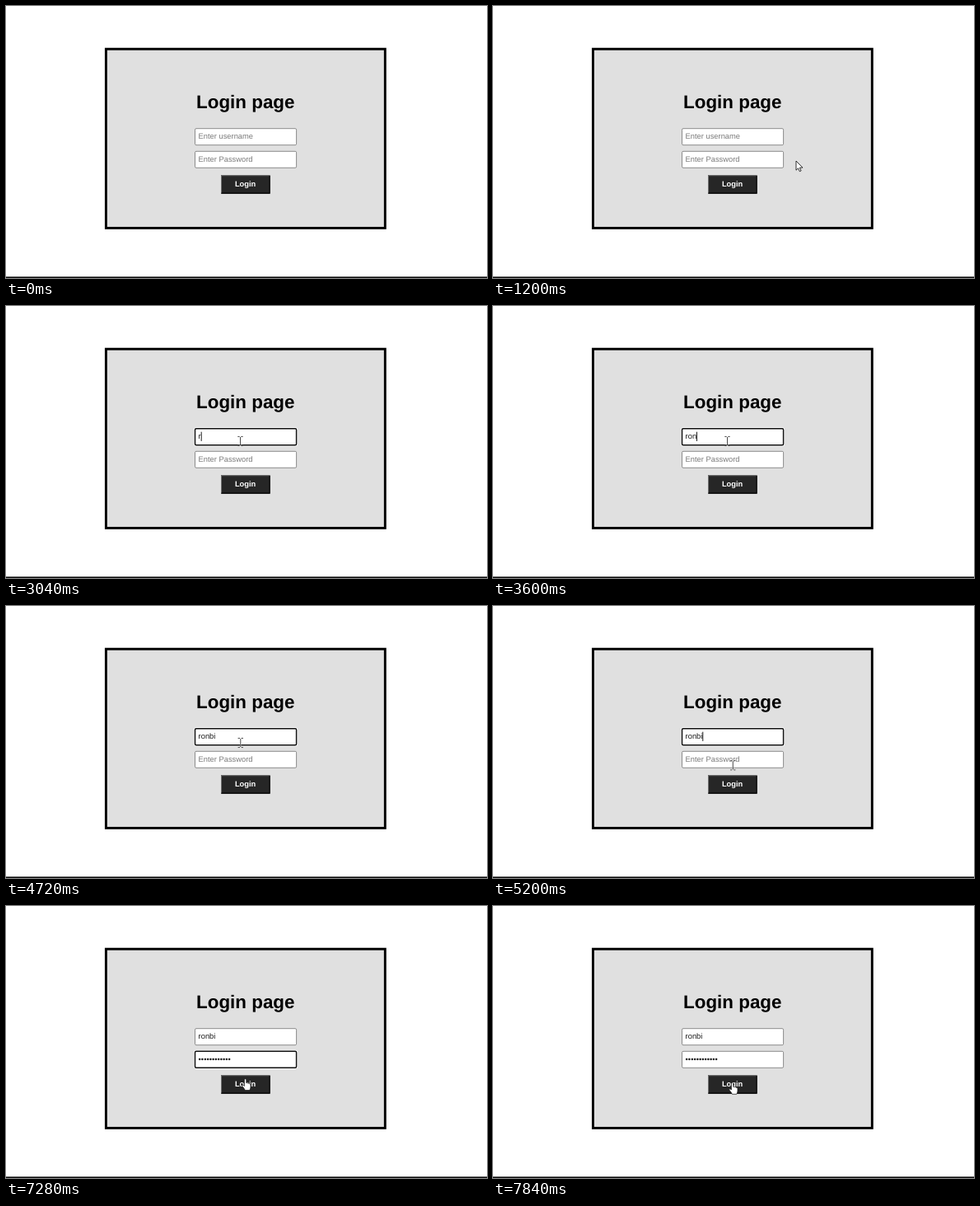
Write an HTML page that moves like this. It is 584x330 px and loops after 8000 ms.

```html
<!DOCTYPE html>
<html lang="en">
<head>
<meta charset="utf-8">
<title>Login page</title>
<style>
  html, body { margin: 0; width: 100%; height: 100%; overflow: hidden; background: #fff; }
  svg { display: block; width: 584px; height: 330px; }
  text { font: 9.33px "Liberation Sans", Arial, sans-serif; text-rendering: geometricPrecision; white-space: pre; }
  .bold { font-weight: bold; text-anchor: middle; }
  .title { font-size: 22.4px; }
  .field { fill: #fff; stroke: #808080; stroke-width: .9; }
  .ring { fill: none; stroke: #fff; stroke-width: 3; }
  .ring + .ring { stroke: #101010; stroke-width: 1.5; }
</style>
</head>
<body>
<svg viewBox="0 0 584 330">
  <defs>
    <path id="arrow" d="M0 0V11.2L2.6 8.8L4.3 12.7L6.1 11.9L4.4 8.1H8Z" fill="#fff" stroke="#000" stroke-width=".8"/>
    <g id="beam" fill="none">
      <path d="M-3.2 -5.6H3.2M0 -5.6V5.6M-3.2 5.6H3.2" stroke="#fff" stroke-width="1.8" opacity=".6"/>
      <path d="M-3.2 -5.6H-.8M.8 -5.6H3.2M0 -5V5M-3.2 5.6H-.8M.8 5.6H3.2" stroke="#333" stroke-width=".9"/>
    </g>
    <path id="hand" d="M-1.2 .8Q0 -.8 1.2 .8V5Q2.3 4.2 3.1 5.3Q4.3 4.7 4.9 5.9Q6.4 5.5 6.4 7.2V10Q6.2 12 5.2 13.8H-.2Q-1.4 11.4 -3.8 8.6Q-4 6.8 -2.4 7.4L-1.2 8.6Z" fill="#fff" stroke="#111" stroke-width=".7"/>
  </defs>

  <rect y="328.4" width="584" height="1.6" fill="#0c0c0c"/>
  <rect x="121.4" y="52.2" width="338.9" height="217.2" fill="#e0e0e0" stroke="#000" stroke-width="2.9"/>
  <text class="bold title" x="290.8" y="124.3">Login page</text>
  <g id="fields"></g>
  <rect x="261" y="205.2" width="59.6" height="22.4" fill="#262626"/>
  <path d="M261.5 227V205.7H320" fill="none" stroke="#707070"/>
  <path d="M261.5 227.1H320.1V206" fill="none" stroke="#000" stroke-width="1.1"/>
  <text class="bold" x="290.6" y="219.4" fill="#fff">Login</text>
  <rect id="caret" width=".9" height="11.2" fill="#000"/>
  <use id="pointer"/>
</svg>
<script>
  const LOOP = 8000;
  const NAME = 'ronbi';
  const LEFT = 233.6;
  const $ = id => document.getElementById(id);

  // [time, value] rows; each value holds until the next row
  const typed = [[0, 0], [3040, 1], [3280, 2], [3600, 3], [3840, 4], [4160, 5]];
  const dots = [[0, 0], [6000, 2], [6080, 3], [6320, 6], [6400, 10], [6560, 11], [6720, 12]];
  const focus = [[0, -1], [2560, 0], [5280, 1], [7840, -1]];
  const caretOn = [[0, 0], [2560, 1], [4720, 0], [5200, 1], [5760, 0], [6000, 1], [7280, 0], [7760, 1], [7840, 0]];
  const pointer = [
    [0, null],
    [1040, ['arrow', 468, 195]], [1120, ['arrow', 420, 193]], [1200, ['arrow', 368, 188]],
    [1280, ['arrow', 328, 181]], [1360, ['arrow', 302, 175]], [1440, ['arrow', 290, 171.5]],
    [1520, ['arrow', 286, 170]],
    [2240, ['beam', 287, 168]], [2320, ['beam', 284.5, 164]],
    [4720, ['beam', 284.8, 166]], [4800, ['arrow', 286, 171.5]], [4880, ['beam', 288.5, 182]],
    [4960, ['beam', 290.6, 190]], [5040, ['beam', 291.3, 193.3]],
    [7120, ['beam', 291.2, 195.5]], [7200, ['arrow', 291, 202]], [7280, ['hand', 290.6, 209.8]],
    [7360, ['hand', 290.6, 212.6]], [7440, ['hand', 290.6, 214.5]]
  ];

  const at = (rows, t) => rows.findLast(row => row[0] <= t)[1];

  function makeField(y, hint) {
    const box = cls => `<rect class="${cls}" x="229.5" y="${y}" width="123.1" height="20" rx="1.5"/>`;
    const group = document.createElementNS('http://www.w3.org/2000/svg', 'g');
    group.innerHTML = `${box('field')}<g>${box('ring')}${box('ring')}</g><text x="${LEFT}" y="${y + 12.6}"></text>`;
    $('fields').append(group);
    return { y, hint, ring: group.querySelector('g'), text: group.querySelector('text') };
  }

  const fields = [makeField(148.7, 'Enter username'), makeField(176.3, 'Enter Password')];

  function show(el, on) {
    el.setAttribute('visibility', on ? 'visible' : 'hidden');
  }

  function draw(now) {
    const t = now % LOOP;
    const active = at(focus, t);
    const values = [NAME.slice(0, at(typed, t)), '•'.repeat(at(dots, t))];

    fields.forEach((field, i) => {
      field.text.textContent = values[i] || field.hint;
      field.text.setAttribute('fill', values[i] ? '#1c1c1c' : '#7a7a7a');
      show(field.ring, i === active);
    });

    const caret = $('caret');
    show(caret, at(caretOn, t));
    if (active >= 0) {
      const { text, y } = fields[active];
      caret.setAttribute('x', LEFT + (values[active] ? text.getComputedTextLength() : 0));
      caret.setAttribute('y', y + 4);
    }

    const pose = at(pointer, t);
    show($('pointer'), pose);
    if (pose) {
      const [shape, x, y] = pose;
      $('pointer').setAttribute('href', '#' + shape);
      $('pointer').setAttribute('transform', `translate(${x} ${y})`);
    }
  }

  const start = performance.now();
  function tick() {
    draw(performance.now() - start);
    requestAnimationFrame(tick);
  }
  tick();
</script>
</body>
</html>
```
